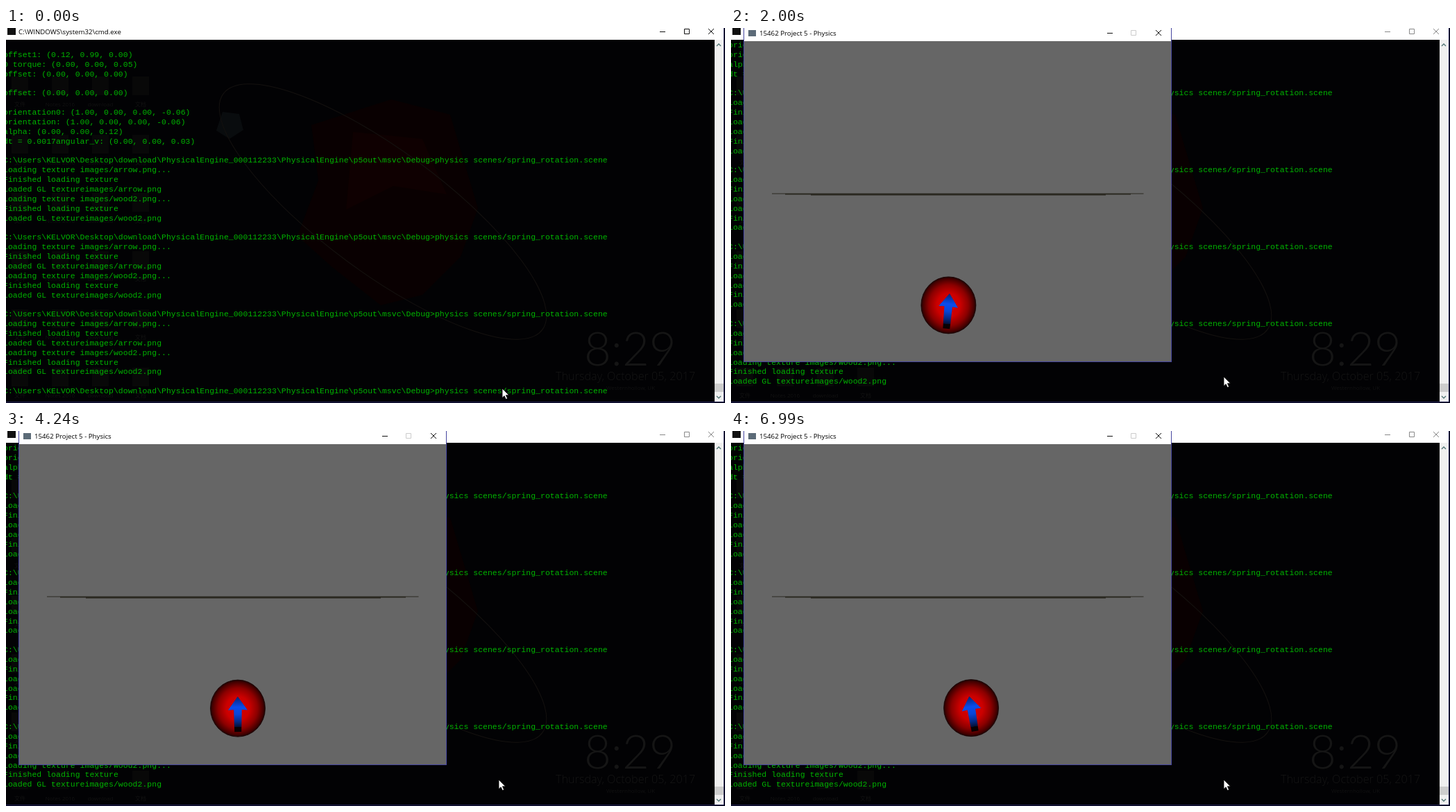
An HTML page that plays this animation: 1036x541 px, repeating every 7110 ms.

```html
<!DOCTYPE html>
<html lang="en">
<head>
<meta charset="utf-8">
<title>Spring rotation</title>
<style>
  html, body { margin: 0; width: 100%; height: 100%; overflow: hidden; background: #020204; }
  svg { display: block; width: 1036px; height: 541px; }
  .term { font: 11.53px "Liberation Mono", monospace; fill: #00b400; }
  .title { font: 9.7px "Open Sans", sans-serif; fill: #000; }
  .faint { font: 8px "Open Sans", "Noto Sans CJK SC", sans-serif; fill: #121212; text-anchor: middle; }
  .clock { font: 300 67px Lato, sans-serif; fill: #151515; }
  .date { font: 300 16.2px "Open Sans", sans-serif; fill: #151515; }
  .btn { fill: none; stroke: #111; }
</style>
</head>
<body>
<svg viewBox="0 0 1036 541" xmlns="http://www.w3.org/2000/svg">
  <defs>
    <radialGradient id="red">
      <stop offset="0" stop-color="#d40000"/>
      <stop offset=".42" stop-color="#cc0000"/>
      <stop offset=".72" stop-color="#8c0000"/>
      <stop offset=".93" stop-color="#430000"/>
      <stop offset="1" stop-color="#1c0000"/>
    </radialGradient>
    <linearGradient id="blue" gradientUnits="userSpaceOnUse" x1="0" y1="-17" x2="0" y2="34">
      <stop offset="0" stop-color="#06246e"/>
      <stop offset=".3" stop-color="#0a4cec"/>
      <stop offset=".5" stop-color="#0846d8"/>
      <stop offset=".7" stop-color="#062c8a"/>
      <stop offset=".86" stop-color="#031038"/>
      <stop offset=".87" stop-color="#080206"/>
      <stop offset="1" stop-color="#0a0000"/>
    </linearGradient>
  </defs>

  <!-- dimmed desktop -->
  <rect width="1036" height="541" fill="#020204"/>
  <path d="M440 140L555 103L640 125L680 260L655 330L600 385L540 400L470 345L420 300L450 220Z" fill="#090001"/>
  <path d="M500 150L600 160L635 240L558 228L490 262Z" fill="#0f0001"/>
  <path d="M312 121L336 124L342 147L322 160L303 148Z" fill="#090c0e"/>
  <ellipse rx="286" ry="88" transform="translate(543 265) rotate(36.5)" fill="none" stroke="#14110f"/>
  <g id="icons"></g>
  <text class="clock" x="833" y="487">8:29</text>
  <text class="date" x="792" y="508">Thursday, October 05, 2017</text>
  <text class="faint" x="900" y="522">Westernhollow, UK</text>

  <!-- console -->
  <g id="log" class="term"></g>
  <rect width="1036" height="17" fill="#fff"/>
  <rect x="2" width="12" height="10" fill="#111"/>
  <text class="title" x="18" y="9">C:\WINDOWS\system32\cmd.exe</text>
  <path id="conBtn" class="btn" d="M942 5.5h8M977.5 1.5h7v7h-7zM1012 1l8 8m0-8l-8 8"/>
  <rect x="1021" y="17" width="13" height="522" fill="#f0f0f0"/>
  <rect x="1021" y="513" width="13" height="12" fill="#cdcdcd"/>
  <path d="M1024 26l3-3l3 3M1024 531l3 3l3-3" fill="none" stroke="#4e7272" stroke-width="1.3"/>
  <path d="M1034.5 0V539.5H0" fill="none" stroke="#1e1e50"/>
  <path d="M1035.5 0V540.5H0" fill="none" stroke="#08081c"/>

  <!-- physics window -->
  <g id="win">
    <path d="M18 0H635V482H18Z" fill="#4646a0"/>
    <rect x="19" width="615" height="19" fill="#fff"/>
    <rect x="19" y="19" width="615" height="462" fill="#666"/>
    <rect x="25" y="3" width="11" height="9" fill="#5c6b78"/>
    <text class="title" x="41" y="11">15462 Project 5 - Physics</text>
    <path class="btn" d="M542 7.5h8M612 3l8 8m0-8l-8 8"/>
    <path class="btn" d="M576.5 3.5h7v7h-7z" style="stroke:#ccc"/>
    <path d="M59 238.5H594.5V239.5H576V240.5H540V241.5H115V240.5H78V239.5H59Z" fill="#2a2820"/>
    <g id="ball">
      <ellipse rx="39.5" ry="41" fill="url(#red)" stroke="#160000" stroke-width=".8"/>
      <path id="arrow" d="M0 -17L14 2.5L5.8 2L5 34H-5L-5.8 2L-14 2.5Z" fill="url(#blue)"/>
    </g>
  </g>
  <path id="cursor" d="M0 0V13.5L3.1 10.7L5.3 15.6L7.6 14.6L5.4 9.8H9.7Z" fill="#fff" stroke="#000" stroke-width=".8"/>
</svg>
<script>
const $ = id => document.getElementById(id);
const LOOP = 7110, LINE = 13.86, SCROLL = 7 * LINE;

function add(parent, tag, attrs, text) {
  const el = document.createElementNS('http://www.w3.org/2000/svg', tag);
  for (const k in attrs) el.setAttribute(k, attrs[k]);
  if (text) el.textContent = text;
  return parent.appendChild(el);
}

// console text
const prompt = 'C:\\Users\\KELVOR\\Desktop\\download\\PhysicalEngine_000112233\\PhysicalEngine\\p5out\\msvc\\Debug>physics scenes/spring_rotation.scene';
const load = ['arrow', 'wood2'].flatMap(n => [
  `Loading texture images/${n}.png...`, 'Finished loading texture', `Loaded GL textureimages/${n}.png`
]);
const run = [prompt, ...load, ''];
const lines = [
  'offset1: (0.12, 0.99, 0.00)', '0 torque: (0.00, 0.00, 0.05)', 'offset: (0.00, 0.00, 0.00)', '',
  'offset: (0.00, 0.00, 0.00)', '',
  'orientation0: (1.00, 0.00, 0.00, -0.06)', 'orientation: (1.00, 0.00, 0.00, -0.06)',
  'alpha: (0.00, 0.00, 0.12)', 'dt = 0.0017angular_v: (0.00, 0.00, 0.03)', '',
  ...run, ...run, ...run, prompt
];
const late = add($('log'), 'g', {});
[...lines, ...load].forEach((s, i) => {
  if (s) add(i < lines.length ? $('log') : late, 'text', { x: -4, y: 42 + i * LINE }, s);
});

// dim icon grid
const labels = ['文件', 'Notes 2016', 'download', '文档'];
for (let row = 0; row < 6; row++) {
  labels.forEach((s, col) => {
    const x = 20 + col * 58, y = 70 + row * 84;
    add($('icons'), 'rect', { x: x - 12, y, width: 24, height: 27, fill: '#080808' });
    add($('icons'), 'text', { class: 'faint', x, y: y + 43 }, s);
  });
}

// bursts of evenly spaced simulation steps: [first, last, count]
const bursts = [
  [450, 1100, 7], [1220, 1880, 7], [2000, 2660, 7], [2780, 3440, 7], [3560, 4100, 6],
  [4240, 4880, 7], [5000, 5660, 7], [5780, 6440, 7], [6550, 6990, 5]
];

function stepAt(t) {
  let base = 0, step = -1;
  for (const [first, last, n] of bursts) {
    if (t < first) break;
    const gap = (last - first) / (n - 1);
    step = base + Math.min(n - 1, Math.floor((t - first) / gap + 0.02));
    base += n;
  }
  return step;
}

const move = (el, x, y) => el.setAttribute('transform', `translate(${x.toFixed(2)} ${y.toFixed(2)})`);

function draw(t) {
  const n = stepAt(t), open = n >= 0;
  $('win').style.display = late.style.display = open ? '' : 'none';
  $('conBtn').style.stroke = open ? '#888' : '#111';
  move($('log'), 0, open ? -SCROLL : 0);
  if (!open) return move($('cursor'), 715, 520);

  // slow swing, plus a fast wobble of the spin
  const swing = Math.cos(0.17167 * ((n || -0.6) - 26.5));
  const dx = 25 * swing;
  const spin = -0.38 * dx - 2.7 * Math.sin(0.675 * n);
  move($('ball'), 327 + dx, 400.2 - swing * swing);
  $('arrow').setAttribute('transform', `rotate(${(n ? spin : 0).toFixed(2)})`);

  const left = Math.max(0, 1 - n / 6);
  move($('cursor'), 710 + 3 * left, 503 + 12 * left);
}

const start = performance.now();
function tick() {
  draw((performance.now() - start) % LOOP);
  requestAnimationFrame(tick);
}
tick();
</script>
</body>
</html>
```
